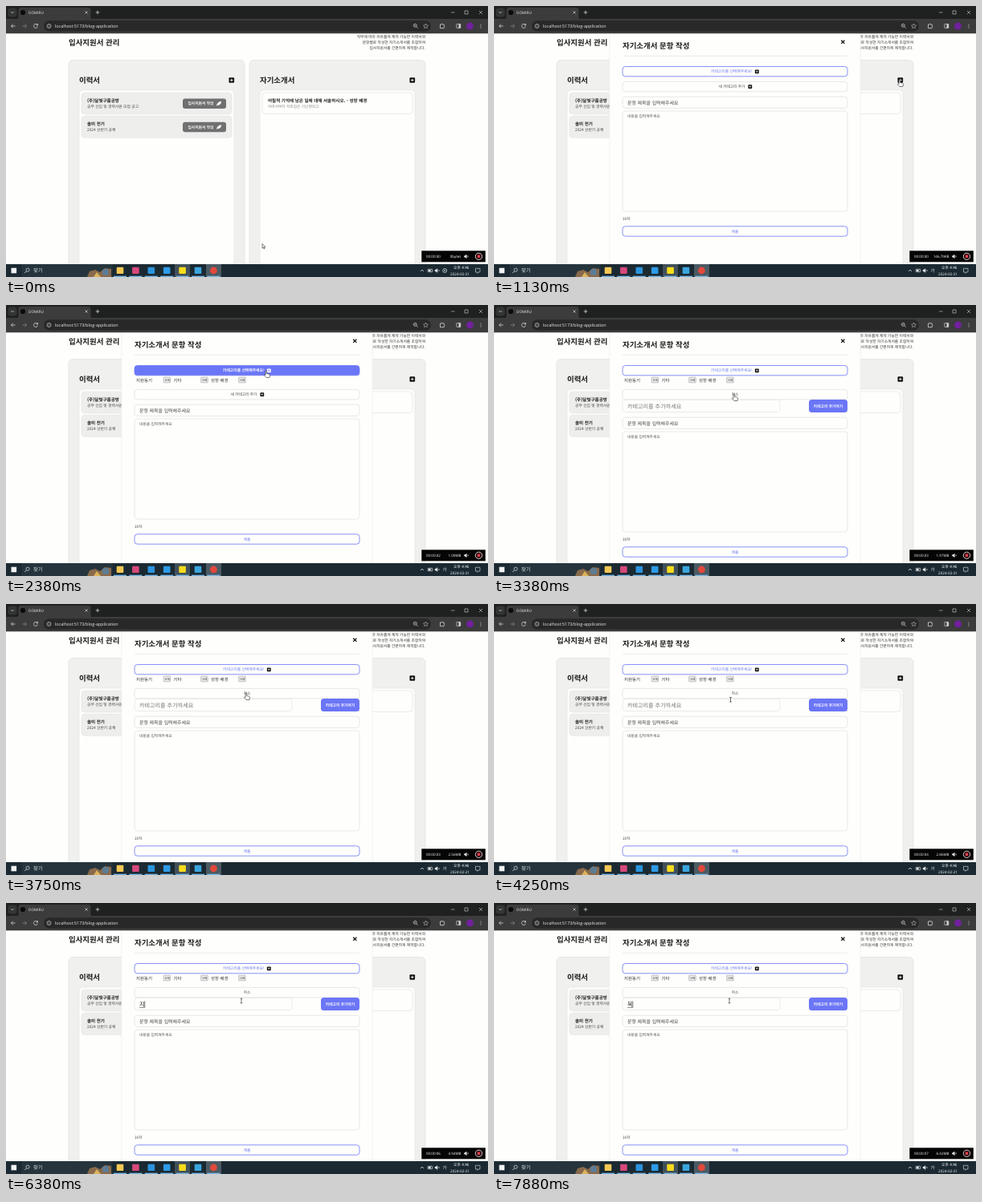
Recreate the animation shown at these times as an HTML page. Size 600 by 338 pixels, loop 8000 ms.

```html
<!DOCTYPE html>
<html lang="ko">
<head>
<meta charset="utf-8">
<style>
html, body { margin: 0; width: 100%; height: 100%; overflow: hidden; background: #fefefc; }
svg { display: block; width: 600px; height: 338px; }
text { font-family: "Noto Sans CJK KR", "Noto Sans CJK", sans-serif; text-rendering: geometricPrecision; white-space: pre; }
.ui { font-family: "Open Sans", "Noto Sans CJK KR", sans-serif; }
</style>
</head>
<body>
<svg id="stage" viewBox="0 0 600 338"></svg>
<script>
const LOOP = 8000, STEP = 125;
const INK = '#1c1c1c', BLUE = '#6b76f6', LINE = '#e2e2e1', PAPER = '#fefefc';

// Shape helpers; text is placed by its vertical centre.
const box = (x, y, w, h, fill, r = 0, stroke = 'none', sw = .7) =>
  `<rect x="${x}" y="${y}" width="${w}" height="${h}" rx="${r}" fill="${fill}" stroke="${stroke}" stroke-width="${sw}"/>`;
const dot = (x, y, r, fill, stroke = 'none', sw = .7) =>
  `<circle cx="${x}" cy="${y}" r="${r}" fill="${fill}" stroke="${stroke}" stroke-width="${sw}"/>`;
const line = (d, stroke, sw = .8, fill = 'none') =>
  `<path d="${d}" fill="${fill}" stroke="${stroke}" stroke-width="${sw}"/>`;
const text = (s, x, cy, size, { fill = INK, weight = 400, anchor = 'start', cls = '' } = {}) =>
  `<text class="${cls}" x="${x}" y="${cy + size * .37}" font-size="${size}" font-weight="${weight}" fill="${fill}" text-anchor="${anchor}">${s}</text>`;
const bold = (s, x, cy, size, opt) => text(s, x, cy, size, { weight: 700, ...opt });
const ui = (s, x, cy, size, opt) => text(s, x, cy, size, { fill: '#eee', cls: 'ui', ...opt });
const plus = (x, y, size, bg = '#111', fg = '#fff') => {
  const h = size / 2, a = size * .28;
  return box(x - h, y - h, size, size, bg, size * .17) +
    line(`M${x - a} ${y}h${2 * a}M${x} ${y - a}v${2 * a}`, fg, size * .13);
};
const cross = (x, y, a, stroke, sw) =>
  line(`M${x - a} ${y - a}l${2 * a} ${2 * a}m0 ${-2 * a}l${-2 * a} ${2 * a}`, stroke, sw);

// Linear interpolation through [time, ...values] keys.
function track(keys, t) {
  const i = keys.findIndex(k => k[0] > t);
  if (i < 0) return keys.at(-1).slice(1);
  if (i === 0) return keys[0].slice(1);
  const a = keys[i - 1], b = keys[i], p = (t - a[0]) / (b[0] - a[0]);
  return a.slice(1).map((v, n) => v + (b[n + 1] - v) * p);
}

function browser() {
  const icon = '#d5d5d5';
  return box(0, 0, 600, 17, '#1f2020') + box(2.5, 2.5, 11, 11, '#343535', 3) +
    line('M6.3 7.2l1.7 1.7 1.7-1.7', icon) +
    line('M13 16.5q2.5 0 2.5-3V5q0-3 3-3h84q3 0 3 3v8.5q0 3 2.5 3z', 'none', 0, '#3c3c3c') +
    dot(21, 8, 3.1, '#0b0b0b') + ui('DOMIRU', 28, 8.2, 4.7) +
    cross(100, 8, 1.6, icon, .7) + line('M111.7 8h4.6M114 5.7v4.6', icon) +
    line('M554 8h4.5M571 6h4v4h-4z', icon, .6) + cross(591, 8, 2, icon, .6) +
    box(0, 16, 600, 18.3, '#3c3c3c') + box(47, 18.3, 482, 13.4, '#282828', 6.7) +
    line('M11.5 25h-5m2.2-2.3L6.4 25l2.3 2.3', icon) +
    line('M20.5 25h5m-2.2-2.3l2.3 2.3-2.3 2.3', '#858585') +
    line('M39 23.5a2.5 2.5 0 1 0 .4 2M39.5 22v2h-2', icon) +
    dot(53.5, 25, 2.5, 'none', icon) + line('M53.5 24.6v1.8M53.5 23.3v.7', icon, .6) +
    ui('localhost:5173/blog-application', 61, 25, 5.4) +
    dot(509.3, 24.3, 2, 'none', icon) + line('M510.8 25.8l2 2M508.3 24.3h2', icon, .7) +
    line('M522.5 22l.9 2 2.1.2-1.6 1.4.5 2.1-1.9-1.1-1.9 1.1.5-2.1-1.6-1.4 2.1-.2z', icon, .5) +
    line('M540.5 23h1.5q.5-2 1.5 0h1.7v1.7q2 .6 0 1.6v1.4h-4.7z', icon) +
    box(560.8, 22.5, 5, 5, 'none', .6, icon) + box(563.5, 22.5, 2.3, 5, icon) +
    dot(577.5, 25, 4.4, '#7220a0') +
    [23, 25, 27].map(y => dot(591, y, .6, icon)).join('');
}

function resumeCard(y, title, sub) {
  return box(94, y, 187, 27, '#eeeeec', 4, '#e6e6e4') +
    bold(title, 101, y + 10, 5.55) + text(sub, 101, y + 17.2, 4.8, { fill: '#444' }) +
    box(220, y + 7.4, 54, 12.5, '#707070', 3) +
    bold('입사지원서 작성', 226.5, y + 13.7, 4.75, { fill: '#fff' }) +
    line(`M262.5 ${y + 16.3}q0-4 5.2-5.2q-.2 4.6-4.2 4.3z`, '#fff', .5, '#fff');
}

function page() {
  const intro = ['직무에 따라 자유롭게 제작 가능한 이력서와', '문항별로 작성한 자기소개서를 조합하여', '입사지원서를 간편하게 제작합니다.'];
  const panel = (x, title) => box(x, 67.5, 219, 270, '#f0f0ee', 5, '#e1e1df') +
    bold(title, x + 13, 92.6, 9.45) + plus(x + 202.8, 92.5, 6.6) +
    box(x + 13, 105, 193, 240, PAPER, 5, '#e6e6e4');
  return box(0, 34, 600, 289, PAPER) + bold('입사지원서 관리', 78, 45.3, 9.45) +
    intro.map((s, i) => text(s, 522, 38.6 + i * 6.6, 4.75, { anchor: 'end', fill: '#333' })).join('') +
    panel(78, '이력서') + panel(303, '자기소개서') +
    resumeCard(108, '(주)달빛구름공방', '공무 신입 및 경력사원 모집 공고') +
    resumeCard(137.3, '솔미 전기', '2024 상반기 공채') +
    box(319, 108, 187, 26.5, PAPER, 4, LINE) +
    bold('어릴적 기억에 남은 일에 대해 서술하시오. - 성장 배경', 326, 118, 5.55) +
    text('어려서부터 저희집은 가난했었고', 326, 125, 4.73, { fill: '#888' });
}

function typed(t) {
  const keys = [[6125, 'ㅈ'], [6250, '지'], [7125, ''], [7500, 'ㅁ'], [7625, '모'], [7750, '목']];
  return keys.findLast(k => k[0] <= t)?.[1] ?? '';
}

function categoryInput(t) {
  const s = typed(t);
  return box(160, 118.3, 196, 15.2, PAPER, 3.5, LINE) +
    (s ? text(s, 166, 126, 7.4, { fill: '#333' }) + line('M166 130.3h6.8v-8', '#333', .6)
       : text('카테고리를 추가하세요', 166, 126, 7.1, { fill: '#777' })) +
    box(392, 118, 48, 16, BLUE, 3.5) +
    bold('카테고리 추가하기', 416, 126, 4.75, { fill: '#fff', anchor: 'middle' });
}

function modal(t) {
  const open = t >= 2250, adding = t >= 3375, hover = t >= 1875 && t < 2750;
  const dy = open ? 11 : 0, low = dy + (adding ? 16 : 0);
  const field = (y, h, stroke = LINE, fill = PAPER) => box(160, y, 280, h, fill, 3.5, stroke, .8);
  const chip = (s, x, del) => text(s, x, 93.5, 5.45, { fill: '#333' }) +
    box(del, 90.2, 8.5, 6.6, '#efefef', .5, '#888', .5) +
    text('삭제', del + 4.25, 93.5, 3.5, { anchor: 'middle' });
  return box(143.5, 34, 313, 290, '#ececea') + box(144.2, 34, 311.6, 290, PAPER) +
    bold('자기소개서 문항 작성', 160, 50, 9.45) + cross(434.3, 44.8, 2.1, '#111', 1.3) +
    line('M160 62.3h280', '#e4e4e3', .7) +
    field(75.5, 12.3, BLUE, hover ? BLUE : PAPER) +
    text('카테고리를 선택해주세요!', 270, 81.7, 4.8, { fill: hover ? '#fff' : BLUE, weight: hover ? 700 : 500 }) +
    plus(327.3, 81.8, 4.8, hover ? '#fff' : '#111', hover ? BLUE : '#fff') +
    (open ? chip('지원동기', 162, 196.2) + chip('기타', 208.5, 242.7) + chip('성장 배경', 255, 289.7) : '') +
    field(94.4 + dy, 12.4) +
    (adding ? text('취소', 300, 111.7, 4.7, { anchor: 'middle', fill: '#555' })
            : text('새 카테고리 추가', 279.5, 100.5 + dy, 4.72, { fill: '#444' }) + plus(318.8, 100.6 + dy, 4.8)) +
    (adding ? categoryInput(t) : '') +
    field(113.2 + low, 14.2) + text('문항 제목을 입력해주세요', 166, 120.4 + low, 5.95, { fill: '#444' }) +
    field(131 + low, 125) + text('내용을 입력해주세요', 166, 137.2 + low, 4.75, { fill: '#555' }) +
    text('10자', 160, 265.2 + low, 4.7, { fill: '#444' }) +
    field(274.8 + low, 12.4, BLUE) +
    text('제출', 300, 281 + low, 4.75, { fill: BLUE, weight: 500, anchor: 'middle' });
}

function taskbar(t) {
  const pale = '#dfe4e6';
  const apps = ['#f3c755', '#d8487c', '#2b94dc', '#2e9be6', '#f8dc1c', '#3aa5dd', '#e2493b'];
  return box(0, 322, 600, 16, '#1b2a32') + box(6.5, 326.7, 6.6, 6.6, '#f2f2f2') +
    box(19.5, 322, 113, 16, '#26353d') + dot(27, 329.2, 2.1, 'none', pale) +
    line('M25.4 330.8l-2.2 2.2', pale) + text('찾기', 34, 330, 6.3, { fill: pale }) +
    line('M101 338l3-7 7-2 6 3 6-5 8 1v10z', 'none', 0, '#8a6a4c') +
    line('M109 338l4-6 5 6z', 'none', 0, '#d9b45d') + box(120, 328, 8, 8, '#5d7c94', 3) +
    box(210, 322, 19, 16, '#41505a') + box(249, 322, 19, 16, '#4b5a63') +
    apps.map((c, i) => {
      const x = 142 + i * 19.4;
      return (i === 6 ? dot(x, 329.8, 4.4, c) : box(x - 4.3, 325.7, 8.6, 8.4, c, 1)) +
        box(x - 8, 336.7, 16, 1.3, '#7cbbea');
    }).join('') +
    line('M516 331l2-2 2 2', pale) + box(525.2, 328.3, 5.5, 3.4, 'none', .3, pale) + box(526, 329, 2.7, 2, pale) +
    line('M534 329h1.3l1.7-1.5v5l-1.7-1.5H534z', pale, .4, pale) + cross(538.7, 330, .9, pale, .5) +
    (t < 1000 ? dot(546.2, 330, 2.5, 'none', pale) + cross(546.2, 330, 1.2, pale, .6)
              : text('가', 546.2, 330, 5.6, { fill: pale, anchor: 'middle' })) +
    text('오후 4:46', 576.5, 326.6, 4.8, { fill: '#fff', anchor: 'end' }) +
    ui('2024-02-21', 577, 333.8, 4.6, { fill: '#fff', anchor: 'end' }) +
    line('M584.5 327.3h5.5v4.6h-2l-1.3 1.4v-1.4h-2.2z', pale, .6);
}

function fileSize(t) {
  if (t < 1000) return '0bytes';
  if (t < 1250) return '146.79KB';
  const [n] = track([[1250, -2.3], [2375, 0], [3750, 5], [5125, 8], [6375, 13], [7875, 18]], t);
  const mb = 1.08 + Math.floor(n + .001) * .2967;
  return mb < 1 ? (mb * 1024).toFixed(2) + 'KB' : mb.toFixed(2) + 'MB';
}

function recorder(t) {
  const sec = Math.max(0, Math.floor((t - 250) / 1000));
  return box(517.3, 305.3, 79.5, 14, '#050505') +
    ui(`00:00:0${sec}`, 523, 312.4, 4.5, { fill: '#fff' }) +
    ui(fileSize(t), 566.5, 312.4, 4.5, { fill: '#fff', anchor: 'end' }) +
    line('M570.5 311.5h1.2l1.6-1.4v4.6l-1.6-1.4h-1.2z', '#fff', .3, '#fff') + cross(575, 312.4, .8, '#fff', .5) +
    dot(588.5, 312.3, 4.2, '#241012', '#f0d9db', .9) + box(586.8, 310.6, 3.4, 3.4, '#e33c4c', .4);
}

function pointer(t) {
  const [x, y] = track([[250, 319, 296.5], [875, 505, 92], [1250, 505, 92], [2000, 324, 82],
    [2625, 324, 82], [3250, 299, 111], [3875, 299, 111], [4375, 293, 122]], t);
  const arrow = t < 875 || (t >= 1375 && t < 1875) || (t >= 2750 && t < 3000);
  const shape = t >= 4125
    ? line('M-1.3-2.8h2.6M0-2.8v5.6M-1.3 2.8h2.6', '#333', .7)
    : arrow
      ? line('M0 0v5.7l1.3-1.2.9 2 .9-.4-.9-1.9h1.8z', '#111', .55, '#fff')
      : line('M-.9 1q0-1 .8-1t.8 1v2.5l2.9.7q1 .3.9 1.5l-.6 2.8h-3.9l-2.6-3q.2-1.1 1.7-.2z', '#111', .55, '#fff');
  return `<g transform="translate(${x} ${y})">${shape}</g>`;
}

const stage = document.getElementById('stage');
const start = performance.now();
let shown = -1;
function tick() {
  const t = Math.floor(((performance.now() - start) % LOOP) / STEP) * STEP;
  if (t !== shown) {
    shown = t;
    stage.innerHTML = page() + (t >= 1000 ? modal(t) : '') + browser() + taskbar(t) + recorder(t) + pointer(t);
  }
  requestAnimationFrame(tick);
}
tick();
</script>
</body>
</html>
```
